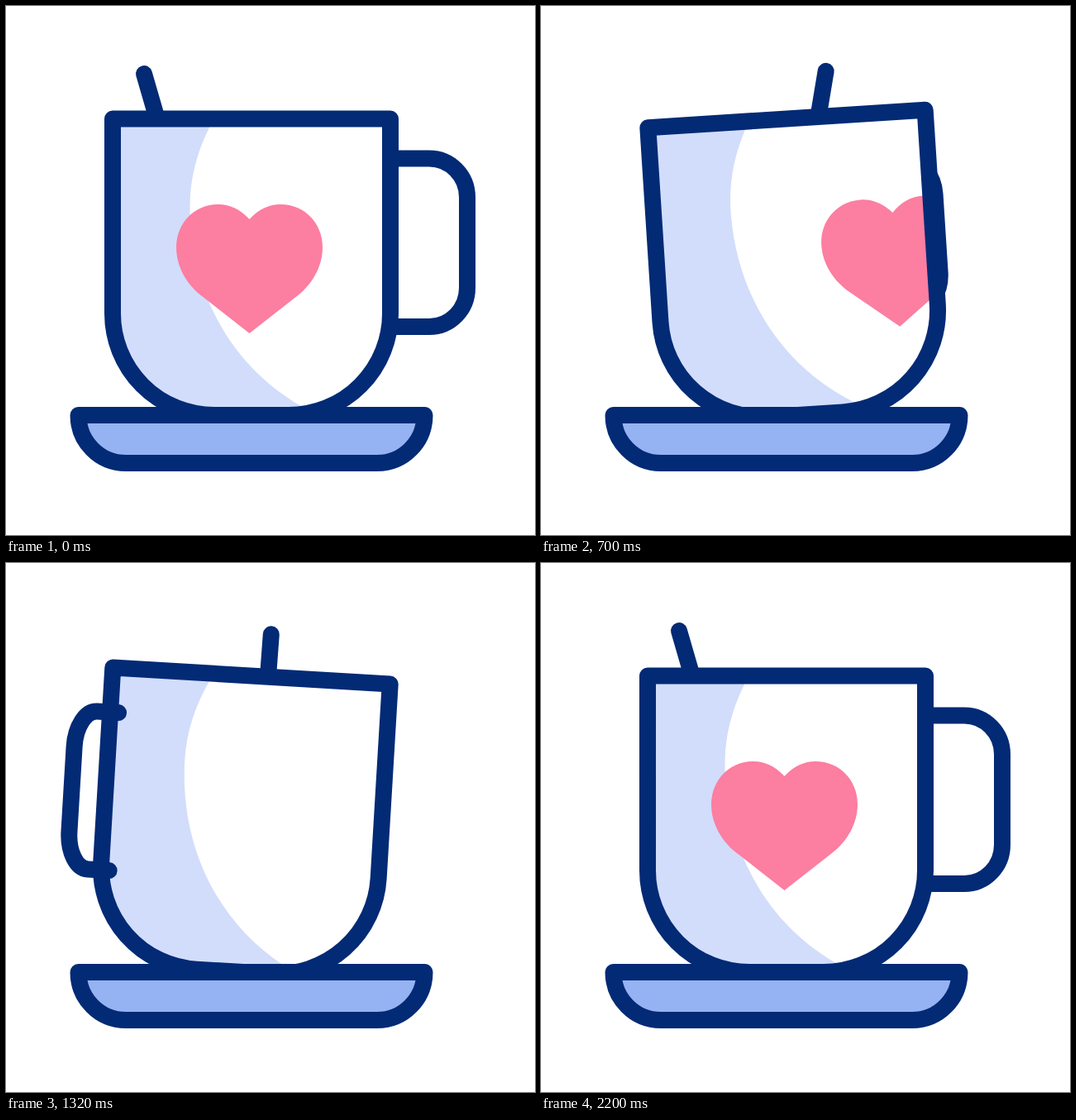
These frames come from a looping animation (640x640 px, 2.4 s). An HTML page:

```html
<!DOCTYPE html>
<html lang="en">
<head>
<meta charset="utf-8">
<title>Cup</title>
<style>
  html, body { margin: 0; width: 100%; height: 100%; overflow: hidden; background: #fff; }
  svg { display: block; width: 100%; height: 100%; }
  .line { fill: none; stroke: #032a75; stroke-width: 20; stroke-linecap: round; stroke-linejoin: round; }
</style>
</head>
<body>
<svg viewBox="0 0 640 640">
  <defs>
    <path id="body" d="M129 136.5H465V372A123 123 0 0 1 342 495H252A123 123 0 0 1 129 372Z"/>
    <clipPath id="inside"><use href="#body"/></clipPath>
  </defs>
  <g id="cup">
    <path id="stick" class="line"/>
    <path id="back" class="line"/>
    <use href="#body" fill="#fff"/>
    <g clip-path="url(#inside)">
      <path fill="#d2ddfb" d="M120 130H255L246 147C231 177 222.5 209 222.5 243C222.5 340 268 433 357 484L380 497H120Z"/>
      <path id="heart" fill="#fc7ea0" d="M0 258C-10 247 -23 240 -37.5 240C-67 240 -88.5 263 -88.5 292C-88.5 315 -76 337 -57.5 351L0 396L57.5 351C76 337 88.5 315 88.5 292C88.5 263 67 240 37.5 240C23 240 10 247 0 258Z"/>
    </g>
    <use href="#body" class="line"/>
    <path id="front" class="line"/>
  </g>
  <path class="line" style="fill:#95b2f3" d="M87.5 495H506.5C506.5 527 481 553 449 553H145C113 553 87.5 527 87.5 495Z"/>
</svg>
<script>
const LOOP = 2400;
const el = id => document.getElementById(id);
const cup = el('cup'), stick = el('stick'), heart = el('heart');
const back = el('back'), front = el('front');

// Smooth curve through [time, value] keys, at rest at both ends and at turning points
function ease(...keys) {
  const grad = (i, j) => (keys[j][1] - keys[i][1]) / (keys[j][0] - keys[i][0]);
  const last = keys.length - 1;
  const slope = keys.map((_, i) => {
    if (i === 0 || i === last) return 0;
    const a = grad(i - 1, i), b = grad(i, i + 1);
    return a * b <= 0 ? 0 : 2 * a * b / (a + b);
  });
  return t => {
    if (t <= keys[0][0]) return keys[0][1];
    if (t >= keys[last][0]) return keys[last][1];
    const i = keys.findIndex(k => k[0] > t) - 1;
    const [t0, v0] = keys[i], [t1, v1] = keys[i + 1];
    const h = t1 - t0, u = (t - t0) / h, w = 1 - u;
    return v0 + (v1 - v0) * u * u * (3 - 2 * u)
      + h * u * w * (slope[i] * w - slope[i + 1] * u);
  };
}

const tilt = ease([0, 0], [1020, -4.8], [1250, 3.6], [1950, -2.6], [2200, 0]);

// Stick: tip position and how far its foot lies to the right of the tip
const tipX = ease([195, 167], [980, 422], [1800, 144], [2200, 167]);
const tipY = ease([980, 82], [1800, 90], [2200, 82]);
const lean = ease([70, 15.8], [980, -21], [1800, 33], [2200, 15.8]);

// Handle runs round the back, then across the front
const turn = ease([520, 465], [1230, 126], [1600, 254.5], [1900, 384], [2200, 465]);
const gripH = ease([0, 1], [800, 0.86], [1750, 1]);

// Small backward pull before the turn
const pull = ease([0, 0], [440, 1], [520, 0]);

const heartOut = ease([520, 294.5], [900, 560]);
const heartIn = ease([1600, 30], [2200, 294.5]);

// Width seen in perspective: 1 at the right rim, negative when facing left
function gripW(x) {
  const u = (x - 138) / 327;
  return -0.55 + 1.55 * u * (0.57 + 0.43 * u);
}

function gripPath(x, sx, sy) {
  const y0 = 286.25 - 101.75 * sy, y1 = 286.25 + 101.75 * sy;
  const flat = x + 47 * sx, bend = x + 72.5 * sx, edge = x + 93 * sx;
  const r = 47 * sy, k = 21 * sy;
  return `M${x} ${y0}H${flat}C${bend} ${y0} ${edge} ${y0 + k} ${edge} ${y0 + r}`
    + `V${y1 - r}C${edge} ${y1 - k} ${bend} ${y1} ${flat} ${y1}H${x}`;
}

function draw(t) {
  cup.setAttribute('transform', `rotate(${tilt(t)} 297 136.5)`);
  stick.setAttribute('d', `M${tipX(t)} ${tipY(t)}L${tipX(t) + lean(t)} 136.5`);

  const x = turn(t), p = pull(t);
  const grip = gripPath(x - 7.3 * p, gripW(x), gripH(t));
  const behind = t > 550 && t < 1230;
  back.setAttribute('d', behind ? grip : '');
  front.setAttribute('d', behind ? '' : grip);

  const heartX = t < 1300 ? heartOut(t) : heartIn(t);
  heart.setAttribute('transform', `translate(${heartX - 5.5 * p} ${-4 * p})`);
}

const start = performance.now();
function tick() {
  draw((performance.now() - start) % LOOP);
  requestAnimationFrame(tick);
}
draw(0);
requestAnimationFrame(tick);
</script>
</body>
</html>
```
